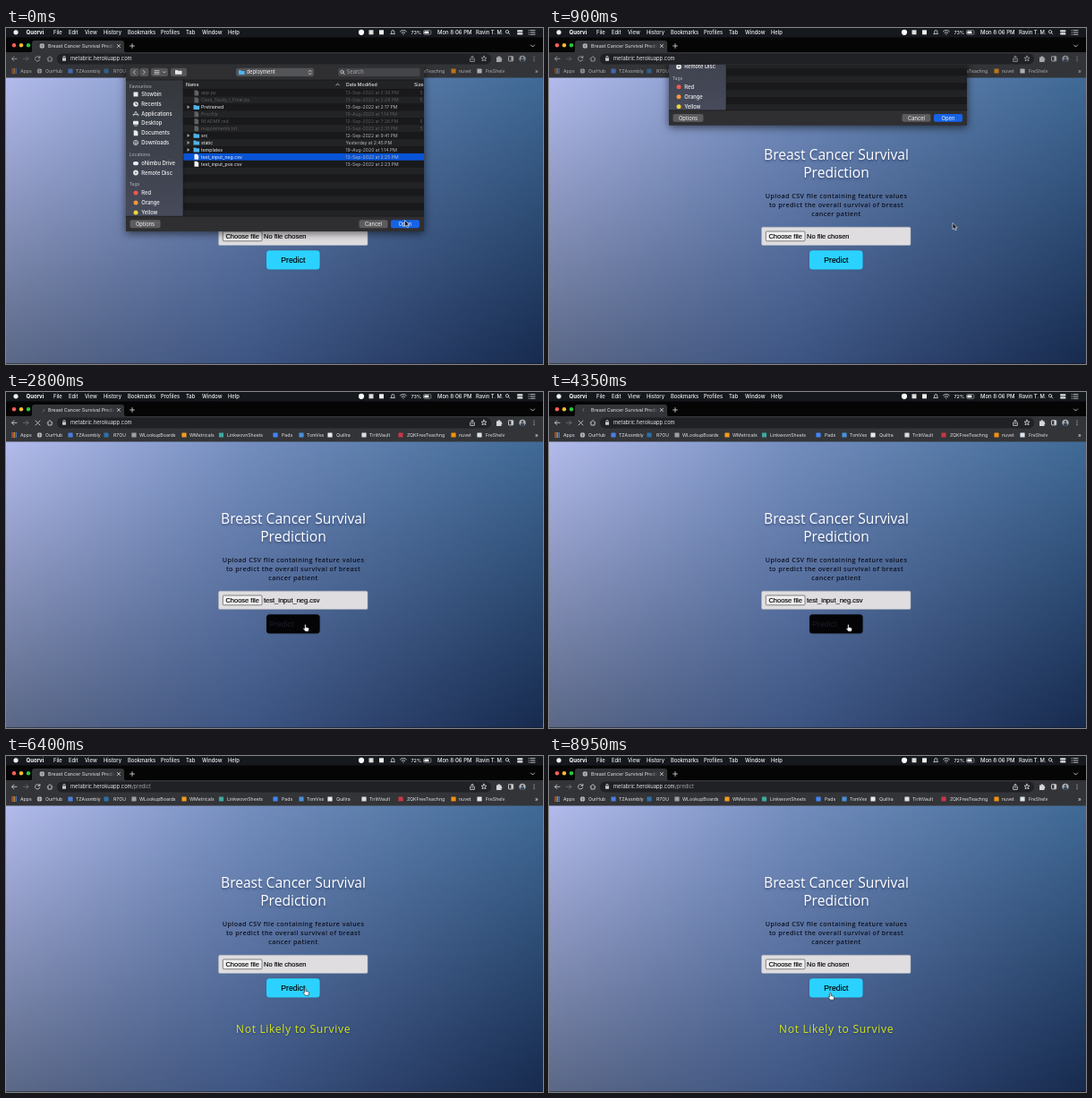
Recreate the animation shown at these times as an HTML page. Size 600 px wide and 375 px high, loop 9000 ms.

```html
<!DOCTYPE html>
<html lang="en">
<head>
<meta charset="utf-8">
<title>Survival prediction demo</title>
<style>
html, body { margin: 0; width: 100%; height: 100%; overflow: hidden; background: #000; }
#page, #page::after { position: absolute; left: 0; width: 600px; }
#page { top: 55px; height: 320px; background: linear-gradient(90deg, #b3bcec, #748ebe 45%, #406a96); }
#page::after { content: ""; top: 0; height: 320px;
  background: linear-gradient(90deg, #5a6786, #3d5583 45%, #172a4e);
  -webkit-mask-image: linear-gradient(transparent, #000); mask-image: linear-gradient(transparent, #000); }
svg { position: absolute; left: 0; top: 0; }
text { font-family: Inter, sans-serif; white-space: pre; }
.open { font-family: "Open Sans", sans-serif; }
.arial { font-family: "Liberation Sans", sans-serif; stroke: currentColor; stroke-width: .15; }
.glow { text-shadow: 0 1.5px 2.5px rgba(10, 20, 60, .4); }
.line { fill: none; stroke: #c9cacd; stroke-width: .9; stroke-linecap: round; stroke-linejoin: round; }
</style>
</head>
<body>
<div id="page"></div>
<svg id="stage" width="600" height="375" viewBox="0 0 600 375"></svg>
<script>
const LOOP = 9000, SHEET_TRAVEL = 190;
const FILE_CHOSEN = 1250, CLICK = 2450, BATTERY_DROP = 3000, LOADED = 5650;

const text = (x, y, str, size, fill = '#e4e5e8', attrs = '') =>
  `<text x="${x}" y="${y + size * .36}" font-size="${size}" fill="${fill}" ${attrs}>${str}</text>`;
const rect = (x, y, w, h, fill, r = 0, attrs = '') =>
  `<rect x="${x}" y="${y}" width="${w}" height="${h}" rx="${r}" fill="${fill}" ${attrs}/>`;
const dot = (x, y, r, fill, attrs = '') => `<circle cx="${x}" cy="${y}" r="${r}" fill="${fill}" ${attrs}/>`;
const line = (d, attrs = '') => `<path class="line" d="${d}" ${attrs}/>`;
const group = (id, body, attrs = '') => `<g id="${id}" ${attrs}>${body}</g>`;
const medium = 'font-weight="500"', middle = 'text-anchor="middle"';

const globe = (x, y) => dot(x, y, 2.7, '#c4c6ca') + line(`M${x - 2.5} ${y}h5M${x} ${y - 2.5}v5`, 'style="stroke:#55575c;stroke-width:.6"');
const lens = (x, y) => line(`M${x + 1.2} ${y + 1.2}l1.6 1.6`) + dot(x, y, 1.7, 'none', 'class="line"');
const folder = (x, y) => `<path d="M${x} ${y - 2.4}h2.4l.8 .8h3.4v4.2h-6.6z" fill="#4fb3ea"/>`;
const sheetOfPaper = (x, y, fill) => `<path d="M${x} ${y - 3}h3l1.7 1.7v4.3h-4.7z" fill="${fill}"/>`;

function menuBar() {
  const items = [[53, 'File'], [70, 'Edit'], [88, 'View'], [109, 'History'], [136, 'Bookmarks'],
    [173, 'Profiles'], [201, 'Tab'], [219, 'Window'], [248, 'Help']];
  return rect(0, 0, 600, 10.5, '#15181c') + dot(11, 4.8, 2.6, '#f0f0f0')
    + text(22.5, 4.8, 'Quorvi', 6, '#fff', 'font-weight="700"')
    + items.map(([x, s]) => text(x, 4.8, s, 5.8, '#f0f0f0', medium)).join('')
    + dot(397, 4.8, 3.1, '#fff') + rect(405.5, 2.3, 5, 5, '#ddd') + rect(417, 2.3, 5, 5, '#eee')
    + line('M430 6.6h4.6l-.8-1.2v-1.4a1.5 1.5 0 0 0-3 0v1.4z')
    + line('M440.4 3.8a5 5 0 0 1 7 0M441.9 5.4a3 3 0 0 1 4 0M443.6 7h.5')
    + text(452.5, 4.8, '73%', 5.4, '#f0f0f0', 'id="battery" ' + medium)
    + rect(466.5, 2.6, 8.4, 4.6, 'none', 1.2, 'stroke="#bbb" stroke-width=".6"') + rect(467.4, 3.5, 5, 2.8, '#fff', .5)
    + text(482, 4.8, 'Mon 8:06 PM', 6, '#f0f0f0', medium) + text(525, 4.8, 'Ravin T. M.', 5.8, '#f0f0f0', medium)
    + lens(560, 4.2) + rect(571, 2.2, 6.5, 2.3, '#ddd', 1.1) + rect(571, 5.3, 6.5, 2.3, '#ddd', 1.1)
    + line('M584 2.6h.3M586 2.6h5M584 4.9h.3M586 4.9h5M584 7.2h.3M586 7.2h5');
}

function browser() {
  const bookmarks = [[37, 44, 'OurHub'], [72, 78, 'TZAssmbly', '#4a7fe0'], [112, 120, 'R7OU', '#2f6fa8'],
    [143, 149, 'WLookupBoards', '#9aa0a6'], [199, 205, 'WMetricals', '#f29a1f'], [240.5, 247, 'LinkwovnSheets', '#3fa7a0'],
    [301, 308, 'Pads', '#4285f4'], [330, 336, 'TomVex', '#4a90d9'], [362, 369, 'Quillra', '#e8e8e8'],
    [400, 406, 'TirlitVault', '#dcdcdc'], [441, 448, 'ZQKFreeTeachng', '#c9364a'],
    [500, 506, 'nuvet', '#f2900f'], [529, 536, 'FreShelv', '#d9e4ee']];
  const apps = [0, 1, 2, 3, 4, 5, 6, 7, 8].map(i =>
    rect(6.3 + i % 3 * 2.1, 45.2 + (i / 3 | 0) * 2.1, 1.5, 1.5, ['#e5544b', '#f0b429', '#4a8af4'][i % 3])).join('');
  const tools = line('M12 34.3H6.5l2.4-2.4m-2.4 2.4l2.4 2.4') + line('M19.5 34.3H25l-2.4-2.4m2.4 2.4l-2.4 2.4', 'opacity=".4"')
    + line('M37.6 33a2.7 2.7 0 1 0 .1 2.4M37.9 31.4v1.9h-1.9', 'id="reload"') + line('M33 32l5 5m0-5l-5 5', 'id="stop"')
    + line('M46 34.4l3-2.8l3 2.8M47 34v3h4v-3')
    + line('M519.3 34h-.6v3.4h4.6v-3.4h-.6M521 35.4v-4m-1.3 1.2l1.3-1.3l1.3 1.3')
    + line('M534 31.2l.9 2h2.1l-1.6 1.4l.6 2.2l-2-1.2l-2 1.2l.6-2.2l-1.6-1.4h2.1z')
    + `<path d="M548 32.4h1.6a1.2 1.2 0 0 1 2.4 0h1.5v1.6a1.2 1.2 0 0 1 0 2.3v1.6h-5.5z" fill="#d5d6d8"/>`
    + rect(561.5, 31.7, 5.2, 5.2, 'none', .5, 'stroke="#d5d6d8" stroke-width=".9"') + rect(564.4, 32, 2, 4.6, '#d5d6d8')
    + dot(577, 34.3, 3.6, '#a9b4bd') + dot(577, 33.2, 1.2, '#54453f') + `<path d="M574.5 36.9a2.5 2.3 0 0 1 5 0a3.6 3.6 0 0 1-5 0" fill="#37475a"/>`
    + dot(590, 32, .6, '#d5d6d8') + dot(590, 34.3, .6, '#d5d6d8') + dot(590, 36.6, .6, '#d5d6d8');
  return rect(0, 10.5, 600, 17, '#050506') + rect(0, 27, 600, 28.5, '#333437')
    + `<path d="M26 27.5q3 0 3-3v-7.5q0-3 3-3h97q3 0 3 3v7.5q0 3 3 3z" fill="#333437"/>`
    + dot(9, 19.3, 2.2, '#ff5f57') + dot(17, 19.3, 2.2, '#febc2e') + dot(25, 19.3, 2.2, '#28c840')
    + group('favicon', globe(40.3, 20)) + line('M40.3 17.6a2.4 2.4 0 0 1 2.4 2.4', 'id="spinner" opacity=".35"')
    + text(47, 20, 'Breast Cancer Survival Predict', 5.4, 'url(#fade)')
    + line('M124.3 18.4l3.2 3.2m0-3.2l-3.2 3.2M141 17.6v4.8m-2.4-2.4h4.8M586.5 19l2 2l2-2')
    + rect(57, 28.6, 485, 11.8, '#202124', 5.9)
    + rect(63, 33.6, 4, 3.2, '#c9cacd', .5) + line('M63.9 33.5v-1a1.1 1.1 0 0 1 2.2 0v1')
    + text(72, 34.3, 'metabric.herokuapp.com<tspan id="path" fill="#9aa0a6"></tspan>', 5.8)
    + group('windowTools', tools + apps + text(16, 48, 'Apps', 5.2) + globe(37.5, 48)
      + bookmarks.map(([ix, x, s, c]) => (c ? rect(ix - 2.6, 45.4, 5.2, 5.2, c, .5) : '') + text(x, 48, s, 5.2)).join('')
      + text(591, 47.6, '»', 6.5));
}

function pageContent() {
  const title = `class="open glow" text-anchor="middle" ` + medium;
  const noteStyle = `class="open" text-anchor="middle" letter-spacing=".4" font-weight="600"`;
  const note = ['Upload CSV file containing feature values', 'to predict the overall survival of breast', 'cancer patient'];
  return text(321, 141.5, 'Breast Cancer Survival', 15.6, '#fff', title) + text(321, 161.7, 'Prediction', 15.6, '#fff', title)
    + note.map((s, i) => text(321, 187 + i * 10.1, s, 7.2, '#0c1120', noteStyle)).join('')
    + rect(237.5, 222.2, 166.5, 20.3, '#dfdde0', 1.5, 'stroke="#a9afb4" stroke-width=".5"')
    + rect(242.3, 227, 43.7, 10.8, '#efefef', 1, 'stroke="#555" stroke-width=".7"')
    + text(264.2, 232.3, 'Choose file', 7.5, '#000', 'class="arial" ' + middle)
    + text(288, 232.3, '', 7.5, '#000', 'id="fileName" class="arial"')
    + rect(291, 248.3, 59.6, 21.2, '#2bd2ff', 3.5, 'id="button" style="filter:drop-shadow(0 .5px 1px #0002)"')
    + text(0, 258.8, 'Predict', 8.7, '#000', 'id="label" class="arial" ' + middle)
    + text(321, 304.5, 'Not Likely to Survive', 12.2, '#d3e51c', 'id="result" class="open glow" letter-spacing=".64" font-weight="500" ' + middle);
}

function fileSheet() {
  const button = (x, w, s, fill) => rect(x, 214.3, w, 8.9, fill, 2) + text(x + w / 2, 218.8, s, 5.8, '#f3f3f3', middle);
  const places = [[74, 'Stowbin'], [85, 'Recents'], [95.5, 'Applications'], [106.3, 'Desktop'], [117.2, 'Documents'],
    [128, 'Downloads'], [151, 'oNimbu Drive'], [161.5, 'Remote Disc'], [184, 'Red'], [195, 'Orange'], [206, 'Yellow']];
  const icons = [
    y => rect(142.5, y - 2.5, 5, 5, '#e8eaec'),
    y => dot(145, y, 2.8, '#e8eaec') + line(`M145 ${y - 1.5}v1.7h1.3`, 'style="stroke:#444"'),
    y => line(`M142.5 ${y + 2.5}l2.5-5l2.5 5m-5.5-1.5h6`),
    y => rect(142, y - 2.5, 6, 4, '#e8eaec', .5) + line(`M143.5 ${y + 2.7}h3`),
    y => sheetOfPaper(142.7, y, '#e8eaec'),
    y => dot(145, y, 2.6, 'none', 'class="line"') + line(`M145 ${y - 1.3}v2.6m-1.2-1l1.2 1.2l1.2-1.2`),
    y => rect(142, y - 2, 6, 4.2, '#e8eaec', 2),
    y => dot(145, y, 2.9, '#dfe1e4') + dot(145, y, .8, '#555'),
    ...['#f2574f', '#f5983a', '#ecd53a'].map(c => y => dot(145, y, 2.5, c))];
  const files = [['app.py', '13-Sep-2022 at 2:30 PM', 'dim'], ['Case_Study_I_Final.py', '13-Sep-2022 at 2:29 PM', 'dim'],
    ['Pretrained', '13-Sep-2022 at 2:17 PM', 'dir'], ['Procfile', '19-Aug-2020 at 1:14 PM', 'dim'],
    ['README.md', '12-Sep-2022 at 7:28 PM', 'dim'], ['requirements.txt', '13-Sep-2022 at 2:31 PM', 'dim'],
    ['src', '12-Sep-2022 at 9:41 PM', 'dir'], ['static', 'Yesterday at 2:45 PM', 'dir'],
    ['templates', '19-Aug-2020 at 1:14 PM', 'dir'], ['test_input_neg.csv', '13-Sep-2022 at 2:25 PM', 'selected'],
    ['test_input_pos.csv', '13-Sep-2022 at 2:23 PM', 'file']];
  let rows = '';
  for (let i = 0; i < 18; i++) {
    const y = 72.5 + i * 7.93, [name, date, kind] = files[i] || [];
    const fill = kind === 'selected' ? '#0854d6' : i % 2 ? '#222325' : '#19191b';
    rows += rect(198, y - 3.96, 269, Math.min(7.96, 214 - y), fill);
    if (!name) continue;
    const ink = kind === 'dim' ? '#5d5e61' : '#f2f2f3';
    rows += (kind === 'dir' ? folder(209.5, y) + `<path d="M202.5 ${y - 2}l3 2l-3 2z" fill="#9a9b9e"/>`
      : sheetOfPaper(210.5, y, kind === 'dim' ? '#606164' : '#f2f2f3'))
      + text(218, y, name, 5.2, ink) + text(379.5, y, date, 5.1, kind === 'dim' ? ink : '#b9babd')
      + (kind === 'dim' && i !== 3 ? text(462.5, y, '5', 5.2, ink) : '');
  }
  return rect(134, 41, 333, 186, '#2f2f31') + rect(134, 58, 64, 152, 'url(#side)') + rect(198, 58, 269, 152, '#19191b')
    + rows + rect(198, 58, 269, 10.2, '#222325') + line('M134 58h333M198 68.3h269M198 58v152M134 210.2h333', 'style="stroke:#111;stroke-width:.5"')
    + text(201, 63, 'Name', 5.2, '#e4e5e8', medium) + line('M368.8 63.7l1.7-1.4l1.7 1.4')
    + text(380, 63, 'Date Modified', 5.2, '#e4e5e8', medium) + text(456, 63, 'Size', 5.2, '#e4e5e8', medium)
    + [[64.7, 'Favourites'], [141, 'Locations'], [174.3, 'Tags']].map(([y, s]) => text(137.7, y, s, 5, '#a4a7ac', medium)).join('')
    + places.map(([y, s], i) => icons[i](y) + text(151.3, y, s, 5.8, '#f2f2f3', medium)).join('')
    + [[138.5, 10], [149.3, 10], [162, 19], [184, 18]].map(([x, w]) => rect(x, 44.7, w, 9.4, '#535457', 2)).join('')
    + line('M144.3 47.4l-2 2l2 2M153.3 47.4l2 2l-2 2M175.5 48.7l1.3 1.3l1.3-1.3M166 47.6h5M166 49.4h5M166 51.2h5')
    + `<path d="M189 47h2.5l.8 .8h4.2v4h-7.5z" fill="#e4e5e8"/>`
    + rect(257, 44.7, 87, 9.4, '#535457', 2) + folder(260, 49.5) + text(268.5, 49.4, 'deployment', 5.8, '#f3f3f3')
    + line('M338.2 48.6l1.5-1.5l1.5 1.5m-3 1.8l1.5 1.5l1.5-1.5')
    + rect(371, 44.7, 91.5, 9.4, '#444548', 2) + lens(375.5, 49) + text(380.5, 49.4, 'Search', 5.8, '#a4a7ac')
    + button(138.5, 34, 'Options', '#5c5c5f') + button(394.5, 32, 'Cancel', '#5c5c5f') + button(430, 32, 'Open', '#1763e6');
}

const defs = `<defs>
  <linearGradient id="fade" gradientUnits="userSpaceOnUse" x1="111" x2="122"><stop stop-color="#e4e5e8"/><stop offset="1" stop-color="#e4e5e8" stop-opacity="0"/></linearGradient>
  <linearGradient id="side" x2="0" y2="1"><stop stop-color="#34383c"/><stop offset="1" stop-color="#464a5a"/></linearGradient>
  <clipPath id="belowToolbar"><rect x="115" y="41" width="371" height="334"/></clipPath></defs>`;
const pointers = group('arrow', '<path d="M0 0v7.2l1.7-1.5l1.2 2.6l1.2-.5l-1.2-2.5h2.3z" fill="#111" stroke="#fff" stroke-width=".6"/>')
  + group('hand', '<path d="M-.8 .3q.8-.9 1.5 0v2.7l2.6 .7q1 .4 .8 1.5l-.6 2.5h-3.6l-2.4-3q0-.9 .9-.7l.8 .6z" fill="#fff" stroke="#111" stroke-width=".6"/>')
  + group('beam', '<path d="M-1.6-4q1.6 0 1.6 1v6q0 1-1.6 1M1.6-4q-1.6 0-1.6 1v6q0 1 1.6 1" fill="none" stroke="#cfd5dd" stroke-width=".7"/>');

document.getElementById('stage').innerHTML = defs + pageContent() + rect(0, 374.2, 600, .8, '#1119') + browser()
  + `<g clip-path="url(#belowToolbar)">${group('sheet', fileSheet(), 'style="filter:drop-shadow(0 2px 5px #0009)"')}</g>` + menuBar() + pointers;
const el = Object.fromEntries([...document.querySelectorAll('[id]')].map(e => [e.id, e]));

const clamp = v => Math.max(0, Math.min(1, v));
const smooth = (t, from, to) => { const p = clamp((t - from) / (to - from)); return p * p * (3 - 2 * p); };
const mix = (a, b, p) => `rgb(${a.map((v, i) => Math.round(v + (b[i] - v) * p))})`;
const show = (e, on) => e.style.display = on ? '' : 'none';

// Pointer stops: time, x, y
const route = [[700, 445.5, 214.5], [900, 451, 217.5], [1650, 451, 217.5], [1800, 414, 229.5], [2100, 334.5, 259.5],
  [7000, 334.5, 259.5], [7250, 300, 290], [7450, 264, 308], [7800, 363, 300], [8000, 381, 303],
  [8500, 354, 303], [8900, 326, 282], [8950, 314.5, 264.5]];

function pointerAt(t) {
  const i = route.findIndex(stop => stop[0] > t);
  if (i <= 0) return (i ? route[route.length - 1] : route[0]).slice(1);
  const [t0, x0, y0] = route[i - 1], [t1, x1, y1] = route[i], p = smooth(t, t0, t1);
  return [x0 + (x1 - x0) * p, y0 + (y1 - y0) * p];
}

function draw(t) {
  const loading = t >= CLICK && t < LOADED, loaded = t >= LOADED;
  const chosen = t >= FILE_CHOSEN && !loaded;
  const hover = loaded ? 0 : smooth(t, 2050, 2550);

  el.sheet.setAttribute('transform', `translate(0 ${-SHEET_TRAVEL * smooth(t, 700, 1045)})`);
  show(el.sheet, t < 1045);
  el.windowTools.setAttribute('opacity', t < FILE_CHOSEN ? .7 : 1);
  el.fileName.textContent = chosen ? 'test_input_neg.csv' : 'No file chosen';
  el.battery.textContent = t < BATTERY_DROP ? '73%' : '72%';
  el.path.textContent = loaded ? '/predict' : '';

  show(el.reload, !loading);
  show(el.stop, loading);
  show(el.favicon, !loading);
  show(el.spinner, loading);
  el.spinner.setAttribute('transform', `rotate(${-t * .36} 40.3 20)`);

  el.button.setAttribute('fill', mix([43, 210, 255], [4, 4, 6], hover));
  const ink = mix([0, 0, 0], [24, 26, 36], hover);
  el.label.setAttribute('fill', ink);
  el.label.style.color = ink;
  el.label.setAttribute('x', 320.8 - 13 * hover);
  show(el.result, loaded);

  const [x, y] = pointerAt(t);
  const within = (left, top, right, bottom) => x > left && x < right && y > top && y < bottom;
  const shape = within(291, 248, 351, 270) ? 'hand' : loaded && within(256, 296, 386, 313) ? 'beam' : 'arrow';
  for (const name of ['arrow', 'hand', 'beam']) show(el[name], name === shape);
  el[shape].setAttribute('transform', `translate(${x} ${y})`);
}

function tick() {
  draw(performance.now() % LOOP);
  requestAnimationFrame(tick);
}
tick();
</script>
</body>
</html>
```
